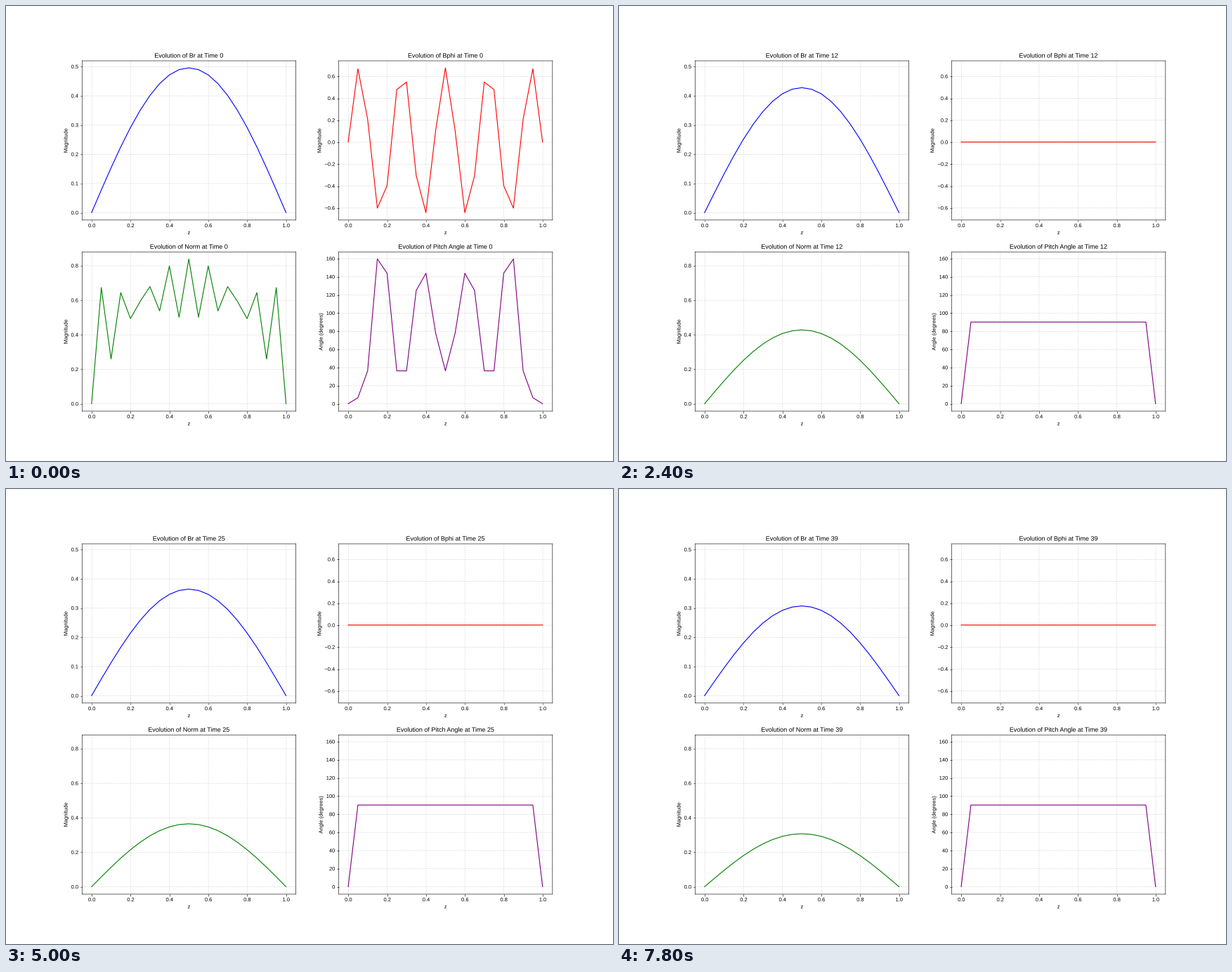
Animation of 864x648 px, one loop 8000 ms. Source, as a matplotlib script:

```python
import numpy as np
import matplotlib.pyplot as plt
from matplotlib.animation import FuncAnimation
from matplotlib.patheffects import Normal
from matplotlib.transforms import ScaledTranslation

plt.rcParams["font.family"] = "Liberation Sans"
plt.rcParams["path.snap"] = False
# Outline text keeps its sub-pixel letter spacing
plt.rcParams["path.effects"] = [Normal()]

FRAMES = 40
INTERVAL = 200
WIDTH, HEIGHT = 16, 12
NUDGE = 0.005  # inches the axes frames sit right of and below the curves

# Two diffusing sine modes on a grid with fixed zero ends
BR_START, BR_DECAY = 0.4953, 0.98779
BPHI_START, BPHI_DECAY = 0.6765, 0.4067

z = np.linspace(0, 1, 21)
PANELS = [
    ("Br", "Magnitude", "blue"),
    ("Bphi", "Magnitude", "red"),
    ("Norm", "Magnitude", "green"),
    ("Pitch Angle", "Angle (degrees)", "purple"),
]


def mode(k):
    wave = np.sin(k * np.pi * z)
    wave[[0, -1]] = 0
    return wave


def fields(t):
    br = BR_START * BR_DECAY**t * mode(1)
    bphi = BPHI_START * BPHI_DECAY**t * mode(9)
    pitch = np.degrees(np.arctan2(br, bphi))
    pitch[[0, -1]] = 0
    return br, bphi, np.hypot(br, bphi), pitch


fig, axes = plt.subplots(2, 2, figsize=(WIDTH, HEIGHT), dpi=54)
dx, dy = NUDGE / WIDTH, NUDGE / HEIGHT
fig.subplots_adjust(left=0.125 + dx, right=0.9 + dx,
                    top=0.88 - dy, bottom=0.11 - dy)
back = ScaledTranslation(-NUDGE, NUDGE, fig.dpi_scale_trans)

lines = []
for ax, (name, ylabel, color), data in zip(axes.flat, PANELS, fields(0)):
    line, = ax.plot(z, data, color=color)
    ax.set_xlabel("z")
    ax.set_ylabel(ylabel)
    ax.grid(True, linestyle="--", alpha=0.5)
    # Keep the limits that fit the starting state
    ax.set_xlim(ax.get_xlim())
    ax.set_ylim(ax.get_ylim())
    line.set_transform(ax.transData + back)
    lines.append(line)


def update(t):
    for ax, line, panel, data in zip(axes.flat, lines, PANELS, fields(t)):
        line.set_ydata(data)
        ax.set_title(f"Evolution of {panel[0]} at Time {t}")
    return lines


anim = FuncAnimation(fig, update, frames=FRAMES, interval=INTERVAL,
                     init_func=lambda: update(0), repeat=True, repeat_delay=0)
plt.show()
```
